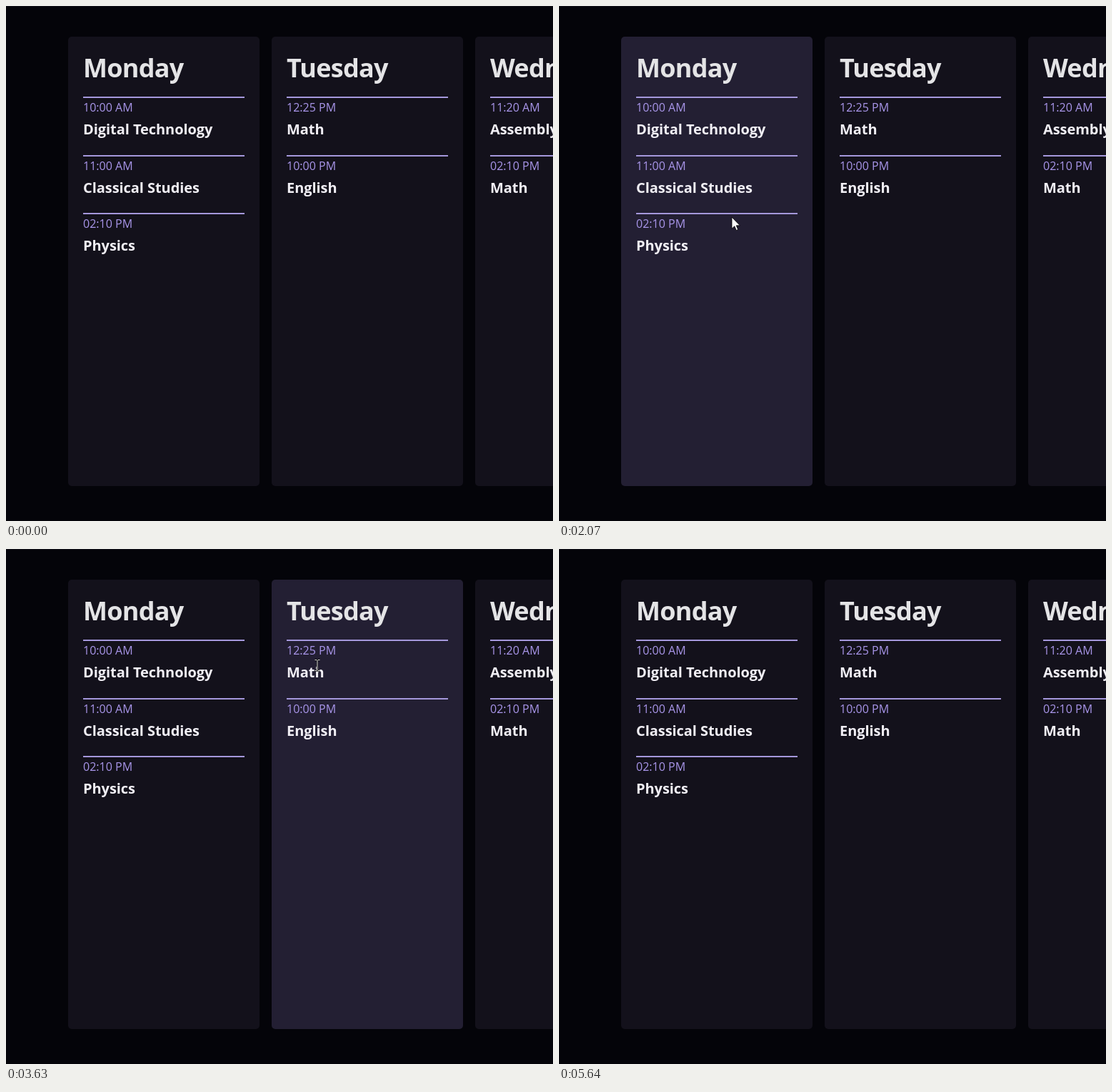
Animation, 766 px wide and 722 px high, one loop 6.24 s. Source, as an HTML page:

```html
<!DOCTYPE html>
<html lang="en">
<head>
<meta charset="utf-8">
<title>Timetable</title>
<style>
* { box-sizing: border-box; margin: 0; }
html, body { width: 100%; height: 100%; overflow: hidden; }
body {
  position: relative;
  background: #040409 linear-gradient(#111118, #111118) 0 0 / 100% 1px no-repeat;
  font-family: "Open Sans", "Noto Sans", sans-serif;
}
#board { position: absolute; left: 87px; top: 43px; display: flex; gap: 17px; }
.card { flex: none; width: 268px; height: 630px; padding: 21px; border-radius: 5px; background: #13111b; }
.card.hover { background: #231f33; }
h1, p { width: fit-content; white-space: nowrap; }
h1 { margin-bottom: 17px; font-size: 36px; font-weight: 700; line-height: 46px; letter-spacing: -.02em; color: #e4e4e6; }
.lesson { height: 81.67px; border-top: 2px solid #a598dc; }
.time { font-size: 16px; line-height: 26px; color: #a996ea; }
.subject { font-size: 20px; font-weight: 700; line-height: 36px; letter-spacing: -.003em; color: #f1eff5; }
#pointer { position: absolute; left: 0; top: 0; overflow: visible; pointer-events: none; }
</style>
</head>
<body>
<div id="board"></div>
<svg id="pointer" width="1" height="1">
  <path id="arrow" d="M0 0V16.2L3.8 12.7 6.3 18.5 8.7 17.4 6.3 11.8H11.4Z" fill="#fff" stroke="#000" stroke-width=".8"/>
  <g id="beam" fill="none">
    <path id="stem" d="M-3.5-7.5H-1L0-6.5 1-7.5H3.5M0-6.5V6.5M-3.5 7.5H-1L0 6.5 1 7.5H3.5" stroke="#111" stroke-width="2.4"/>
    <use href="#stem" style="display:none"/>
  </g>
</svg>
<script>
const LOOP = 6240, STEPS = 93, STEP = LOOP / STEPS;
const HOVER_LAG = 0.3; // the cards react slightly after the pointer, in steps

const week = {
  Monday: [["10:00 AM", "Digital Technology"], ["11:00 AM", "Classical Studies"], ["02:10 PM", "Physics"]],
  Tuesday: [["12:25 PM", "Math"], ["10:00 PM", "English"]],
  Wednesday: [["11:20 AM", "Assembly"], ["02:10 PM", "Math"]]
};

// Rests and turning points of the pointer: step, x, y
const keys = [
  [7, 775, 735], [13, 690, 300], [14, 690, 300],
  [24, 41, 312], [26, 17, 296], [28, 17, 296],
  [36, 727, 297], [39, 500, 285], [46, 65, 251], [48, 46, 238],
  [54, 436, 163], [59, 700, 210], [61, 700, 210],
  [66, 350, 225], [71, 150, 260],
  [81, 678, 708], [83, 693, 717], [84, 700, 735]
];

const $ = id => document.getElementById(id);

// Light copy of the beam over its dark outline
const core = $("stem").cloneNode();
core.removeAttribute("id");
core.setAttribute("stroke", "#ddd");
core.setAttribute("stroke-width", 1);
$("beam").lastElementChild.replaceWith(core);

$("board").innerHTML = Object.entries(week).map(([day, lessons]) =>
  `<section class="card"><h1>${day}</h1>${lessons.map(([time, subject]) =>
    `<div class="lesson"><p class="time">${time}</p><p class="subject">${subject}</p></div>`).join("")}</section>`
).join("");
const cards = document.querySelectorAll(".card");

// Speed along one axis at a key; zero at ends, rests and reversals
function speed(i, axis) {
  const before = keys[i - 1], key = keys[i], after = keys[i + 1];
  if (!before || !after) return 0;
  const turns = (after[axis] - key[axis]) * (key[axis] - before[axis]) <= 0;
  return turns ? 0 : (after[axis] - before[axis]) / (after[0] - before[0]);
}

// Cubic Hermite curve through the keys
function pointAt(step) {
  const last = keys.length - 1;
  const t = Math.min(Math.max(step, keys[0][0]), keys[last][0]);
  const j = Math.max(1, keys.findIndex(key => key[0] >= t)), i = j - 1;
  const span = keys[j][0] - keys[i][0], u = (t - keys[i][0]) / span, v = 1 - u;
  return [1, 2].map(axis =>
    keys[i][axis] * v * v * (1 + 2 * u) + keys[j][axis] * u * u * (1 + 2 * v) +
    span * u * v * (speed(i, axis) * v - speed(j, axis) * u));
}

const elementAt = point => document.elementFromPoint(...point);

function draw(now) {
  const step = Math.floor((now % LOOP + 16) / STEP) % STEPS;
  const [x, y] = pointAt(step).map(Math.round);
  const overText = Boolean(elementAt([x, y])?.matches("h1, p"));
  const hovered = elementAt(pointAt(step - HOVER_LAG))?.closest(".card");

  cards.forEach(card => card.classList.toggle("hover", card === hovered));
  $("pointer").style.transform = `translate(${x}px, ${y}px)`;
  $("arrow").style.display = overText ? "none" : "";
  $("beam").style.display = overText ? "" : "none";
}

const start = performance.now();
function tick() {
  draw(performance.now() - start);
  requestAnimationFrame(tick);
}
tick();
</script>
</body>
</html>
```
